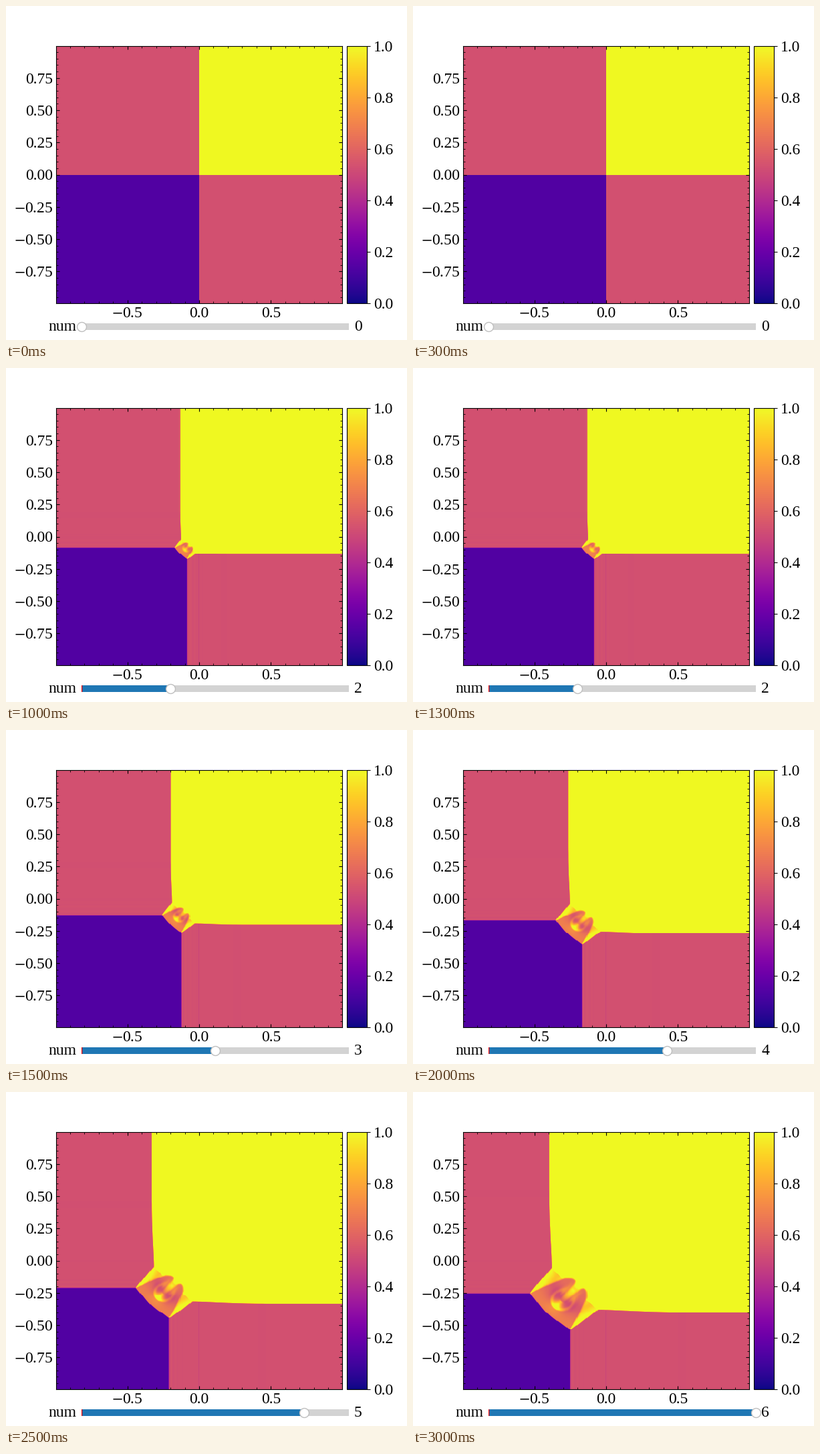
These frames come from a looping animation (600x500 px, 3.5 s). A matplotlib script:

```python
import numpy as np
import matplotlib.pyplot as plt
from matplotlib.animation import FuncAnimation
from matplotlib.ticker import AutoMinorLocator, FuncFormatter, MultipleLocator
from matplotlib.widgets import Slider

# Four-quadrant gas dynamics problem, solved on a window that grows with the waves
GAMMA = 1.4
CELLS = 400
DX = 2 / CELLS
SNAPSHOTS = 7
STEPS = 120
DT = 0.1 / STEPS
MARGIN = 8
SWAP = [0, 2, 1, 3]

W, H = 600, 500


def conserved(q):
    r, u, v, p = q
    return np.stack([r, r * u, r * v, p / (GAMMA - 1) + 0.5 * r * (u * u + v * v)])


def primitive(U):
    r, mx, my, e = U
    u, v = mx / r, my / r
    return np.stack([r, u, v, (GAMMA - 1) * (e - 0.5 * (mx * u + my * v))])


def hllc(ql, qr):
    rl, ul, _, pl = ql
    rr, ur, _, pr = qr
    cl, cr = np.sqrt(GAMMA * pl / rl), np.sqrt(GAMMA * pr / rr)
    sl = np.minimum(ul - cl, ur - cr)
    sr = np.maximum(ul + cl, ur + cr)
    ml, mr = rl * (sl - ul), rr * (sr - ur)
    sm = (pr - pl + ul * ml - ur * mr) / (ml - mr)

    # Only the side upwind of the contact is needed
    left = sm > 0
    q = np.where(left, ql, qr)
    r, u, v, p = q
    s = np.where(left, sl, sr)
    speed = np.where(left, np.minimum(sl, 0), np.maximum(sr, 0))
    U = conserved(q)
    e = U[3]
    F = u * U
    F[1] += p
    F[3] += u * p
    m = r * (s - u)
    k = m / (s - sm)
    star = np.stack([k, k * sm, k * v, k * (e / r + (sm - u) * (sm + p / m))])
    return F + speed * (star - U)


def rate(U):
    q = np.pad(primitive(U), ((0, 0), (0, 0), (2, 2)), "edge")
    d = np.diff(q, axis=2)
    a, b = d[..., :-1], d[..., 1:]
    half = np.maximum(a * b, 0) / (a + b + np.float32(1e-12))
    mid = q[..., 1:-1]
    F = hllc(mid[..., :-1] + half[..., :-1], mid[..., 1:] - half[..., 1:])
    dF = np.diff(F, axis=2) / np.float32(DX)
    # The problem is symmetric about the diagonal, so y fluxes mirror x fluxes
    return -(dF + dF.transpose(0, 2, 1)[SWAP])


def simulate():
    lo = hi = MARGIN
    x = np.arange(-lo, hi) >= 0
    right, top = x[None, :], x[:, None]
    corner = right & top
    both = ~right & ~top
    q = np.stack([
        np.where(corner, 1.5, np.where(both, 0.138, 0.5323)),
        np.where(right, 0, 1.206) + 0 * top,
        np.where(top, 0, 1.206) + 0 * right,
        np.where(corner, 1.5, np.where(both, 0.029, 0.3)),
    ]).astype(np.float32)
    U = conserved(q)
    dt = np.float32(DT)
    half = CELLS // 2
    fields = []
    for n in range((SNAPSHOTS - 1) * STEPS + 1):
        if n % STEPS == 0:
            edge = (half - lo, half - hi)
            fields.append(np.pad(U[0], (edge, edge), "edge"))
        t = n * DT
        grow = (max(0, int(0.95 * t / DX) + MARGIN - lo),
                max(0, int(1.2 * t / DX) + MARGIN - hi))
        if max(grow) > 0:
            U = np.pad(U, ((0, 0), grow, grow), "edge")
            lo, hi = lo + grow[0], hi + grow[1]
        first = U + dt * rate(U)
        U = np.float32(0.5) * (U + first + dt * rate(first))
    return fields


def box(x, y, w, h):
    """Axes rectangle from pixels measured at the lower left."""
    return [x / W, y / H, w / W, h / H]


def number(places):
    return FuncFormatter(lambda v, _: f"{v + 0.0:.{places}f}".replace("-", "$-$"))


plt.rcParams.update({
    "font.family": "Liberation Serif",
    "font.size": 17,
    "mathtext.fontset": "stix",
})

fields = simulate()

fig = plt.figure(figsize=(W / 100, H / 100), dpi=100)
ax = fig.add_axes(box(75, 55, 428.04, 385))
edge = 1 - DX / 2
image = ax.imshow(fields[0], cmap="plasma", vmin=0, vmax=1, origin="lower",
                  extent=(-edge, edge, -edge, edge), aspect="auto",
                  interpolation="nearest")
for axis, step, places in ((ax.xaxis, 0.5, 1), (ax.yaxis, 0.25, 2)):
    axis.set_major_locator(MultipleLocator(step))
    axis.set_minor_locator(AutoMinorLocator(5))
    axis.set_major_formatter(number(places))
ax.tick_params(which="both", direction="in", top=True, right=True)

bar = fig.colorbar(image, cax=fig.add_axes(box(510.04, 55, 29.96, 385)))
bar.set_ticks(np.linspace(0, 1, 6))
bar.ax.yaxis.set_major_formatter(number(1))

slider = Slider(fig.add_axes(box(113, 10, 400, 20)), "num", 0, SNAPSHOTS - 1,
                valinit=0, valstep=1, valfmt="%d")
slider.drawon = False


def update(i):
    image.set_data(fields[i])
    slider.set_val(i)
    return image,


anim = FuncAnimation(fig, update, frames=SNAPSHOTS, interval=500,
                     init_func=lambda: update(0), repeat=True, repeat_delay=0)
plt.show()
```
